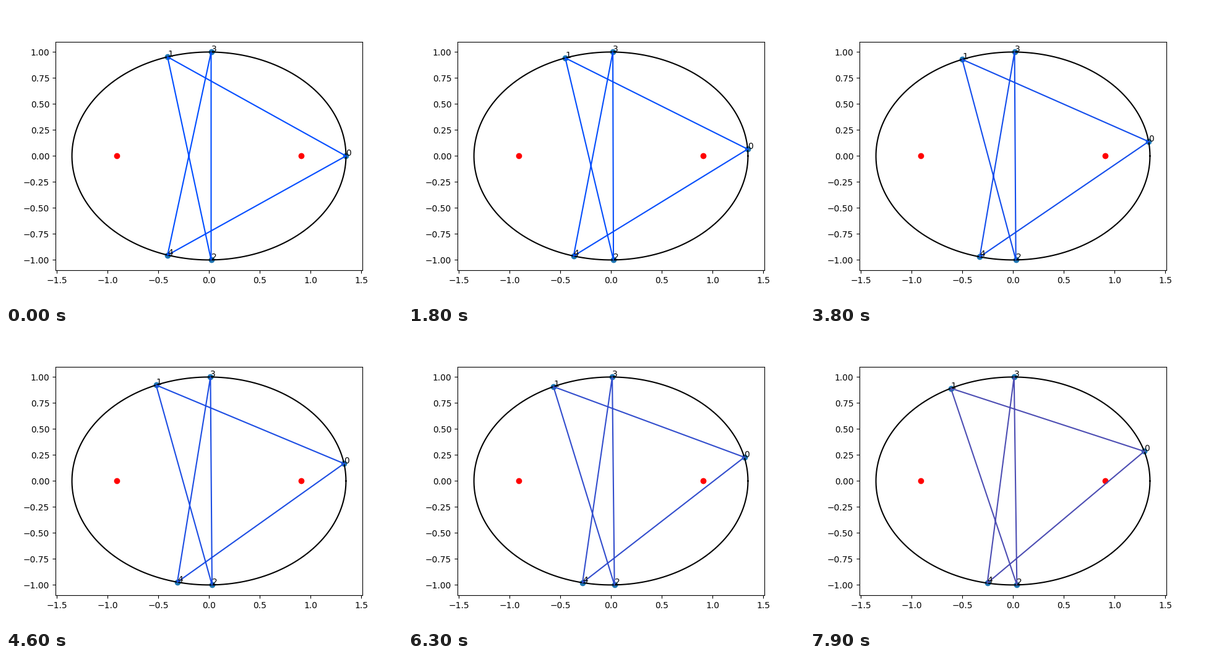
A matplotlib script that plays this animation: 640 by 480 pixels, repeating every 8000 ms.

```python
import numpy as np
import matplotlib.pyplot as plt
from matplotlib.animation import FuncAnimation

A, B = 1.35, 1.0        # semi-axes
FRAMES, INTERVAL = 80, 100
STEP = 0.00366          # advance of vertex 0 per frame, in radians


def point(t):
    return np.stack([A * np.cos(t), B * np.sin(t)], axis=-1)


def tangent(t):
    return np.stack([-A * np.sin(t), B * np.cos(t)], axis=-1)


def equilateral(t0, guess):
    """Newton solve: angles 1..4 and squared side of the equal-sided star."""
    v = np.array(guess, float)
    for _ in range(12):
        t = np.concatenate([[t0], v[:4]])
        tan = tangent(t)
        p = point(t)
        d = np.roll(p, -1, axis=0) - p
        jac = np.zeros((5, 5))
        for k in range(5):
            n = (k + 1) % 5
            jac[k, k] -= 2 * d[k] @ tan[k]
            jac[k, n] += 2 * d[k] @ tan[n]
        jac = np.column_stack([jac[:, 1:], -np.ones(5)])
        v -= np.linalg.solve(jac, (d ** 2).sum(axis=1) - v[4])
    return v


angles = np.arange(FRAMES) * STEP
sol = np.append(np.radians([107.5, -89.1, 89.1, -107.5]), 4.0)
stars = []
for t0 in angles:
    sol = equilateral(t0, sol)
    stars.append(point(np.append(t0, sol[:4])))

fig, ax = plt.subplots(figsize=(6.4, 4.8), dpi=100)
ax.set_xlim(-1.512, 1.512)
ax.set_ylim(-1.1, 1.1)

ax.plot(*point(np.linspace(0, 2 * np.pi, 400)).T, color="black")
focus = np.sqrt(A ** 2 - B ** 2)
ax.scatter([-focus, focus], [0, 0], color="red")

dots = ax.scatter(*stars[0].T, color="C0")
star, = ax.plot([], [])
labels = [ax.text(0, 0, str(k)) for k in range(5)]


def draw(i):
    pts = stars[i]
    dots.set_offsets(pts)
    star.set_data(*np.vstack([pts, pts[:1]]).T)
    red = np.sin(2 * angles[i]) ** 2
    star.set_color((red, 0.3, 1 - red))
    for label, p in zip(labels, pts):
        label.set_position(p)
    return [dots, star, *labels]


anim = FuncAnimation(fig, draw, frames=FRAMES, interval=INTERVAL,
                     repeat=True, repeat_delay=0)
plt.show()
```
